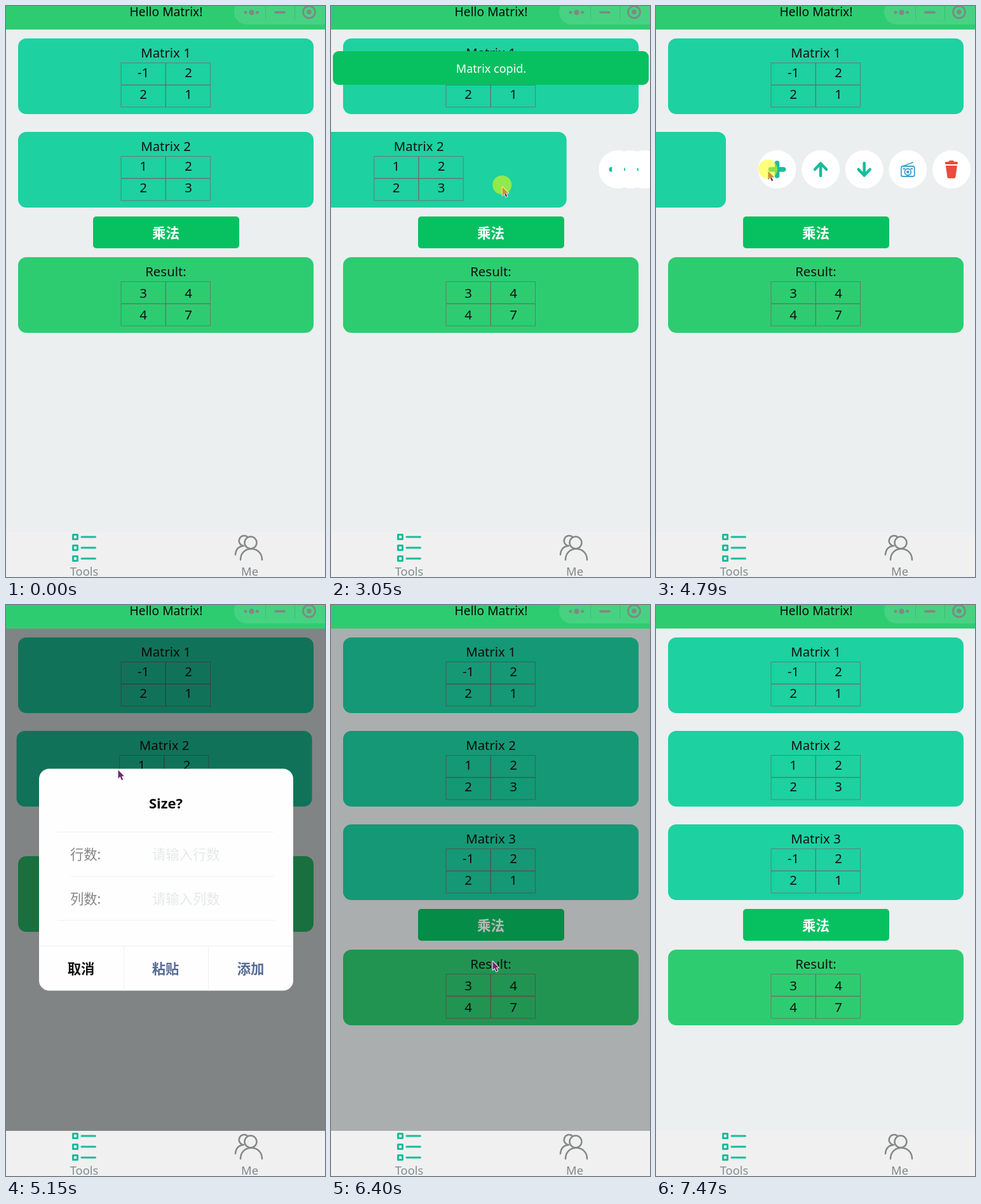
An HTML page with a canvas for the animation above (8090 ms loop, 502 by 898 pixels).

```html
<!DOCTYPE html>
<html lang="zh">
<head>
<meta charset="utf-8">
<title>Hello Matrix!</title>
<style>
html, body { margin: 0; width: 100%; height: 100%; overflow: hidden; }
canvas { display: block; }
</style>
</head>
<body>
<canvas id="stage" width="502" height="898"></canvas>
<script>
const ctx = document.getElementById('stage').getContext('2d');
const LOOP = 8090;
const FONT = '"Noto Sans", "Noto Sans CJK SC", "Noto Sans CJK", sans-serif';
const TEAL = '#1abc9c', CARD = '#1dd1a1', GREEN = '#2ecc71', BUTTON = '#07c160', GRAY = '#808888';

// Pointer tip: time, x, y
const path = [
  [550, 270, 424], [700, 291, 300], [910, 329, 134],
  [2010, 329, 134], [2300, 275, 280], [2450, 263, 337], [2800, 382.5, 304],
  [2950, 382.5, 304], [3050, 270, 284], [3200, 149, 267],
  [3730, 149, 267], [3810, 176, 259],
  [5310, 176, 259], [5610, 254, 560],
  [7150, 254, 560], [7240, 240, 630], [7470, 372, 898]
];
const presses = [[1070, 1880], [2950, 3250], [4790, 4880], [6120, 6200]];

const progress = (t, start, length) => Math.min(1, Math.max(0, (t - start) / length));
const easeOut = p => 1 - (1 - p) ** 3;

function pointerAt(t) {
  const i = path.findIndex(k => k[0] > t);
  if (i < 1) return null;
  const [t0, x0, y0] = path[i - 1], [t1, x1, y1] = path[i];
  const p = (t - t0) / (t1 - t0);
  return [x0 + (x1 - x0) * p, y0 + (y1 - y0) * p];
}

function slideAt(t) {
  if (t < 2950) return 0;
  if (t < 3250) return 382.5 - pointerAt(t)[0];
  if (t < 4850) return 233.5 + 140.5 * easeOut(progress(t, 3250, 480));
  return 374 * (1 - easeOut(progress(t, 4850, 370)));
}

function maskAt(t) {
  return t < 6200 ? 0.5 * progress(t, 4880, 300) : 0.5 * (1 - progress(t, 6200, 300) ** 2);
}

function text(s, x, y, size, color = '#111', weight = 400, align = 'center') {
  ctx.font = `${weight} ${size}px ${FONT}`;
  ctx.textAlign = align;
  ctx.fillStyle = color;
  ctx.fillText(s, x, y);
}

function box(x, y, w, h, r, color) {
  ctx.fillStyle = color;
  ctx.beginPath();
  ctx.roundRect(x, y, w, h, r);
  ctx.fill();
}

function disc(x, y, r, color) {
  ctx.fillStyle = color;
  ctx.beginPath();
  ctx.arc(x, y, r, 0, 7);
  ctx.fill();
}

function stroke(d, color, width) {
  ctx.strokeStyle = color;
  ctx.lineWidth = width;
  ctx.stroke(new Path2D(d));
}

function card(title, y, cells, color = CARD, drop = 0) {
  box(19, y, 465, 119, 13, color);
  text(title, 251.5, y + 30, 20.4);
  cells.forEach((value, i) => {
    const col = i % 2, row = i >> 1;
    ctx.strokeStyle = 'rgba(125,95,100,.75)';
    ctx.lineWidth = 1;
    ctx.strokeRect(181.5 + col * 70, y + 38.5 + row * 35, 70, 34.5);
    text(value, 216 + col * 71, y + 61 + drop + row * 34, 20.4);
  });
}

const icons = [
  () => stroke('M0-10V10M-10 0H10', TEAL, 7.5),
  () => stroke('M0 10V-9M-9 0L0-9.5L9 0', TEAL, 4.5),
  () => stroke('M0-10V9M-9 0L0 9.5L9 0', TEAL, 4.5),
  () => {
    stroke('M-8-5H8Q10.500-5 10.500-2V8Q10.500 11 8 11H-8Q-10.500 11-10.500 8V-2Q-10.500-5-8-5M-8-5L8-11M-7-1H-5M5-1H7', '#419fcb', 1.8);
    stroke('M-5 4A5 5 0 1 1 5 4A5 5 0 1 1-5 4', '#419fcb', 1.8);
    disc(0, 4, 2.3, '#419fcb');
  },
  () => {
    box(-10, -12, 20, 4, 1.5, '#e74c3c');
    box(-4, -14, 8, 4, 1.5, '#e74c3c');
    ctx.fill(new Path2D('M-9-6H9L6.500 12Q6 14 4 14H-4Q-6 14-6.500 12Z'));
  }
];

function actions(slide) {
  icons.forEach((icon, i) => {
    const x = 564.5 - (374 - 68.6 * i) * slide / 374;
    ctx.save();
    ctx.translate(x, 257);
    disc(0, 0, 30, '#fff');
    icon();
    ctx.restore();
  });
}

function header() {
  box(0, 0, 502, 37, 0, GREEN);
  text('Hello Matrix!', 252, 16, 19.2, '#0a0a0a');
  box(359, -10, 160, 39, 19.5, 'rgba(255,255,255,.12)');
  const mark = '#808984';
  disc(377, 10, 2.5, mark);
  disc(386.5, 10, 4.3, mark);
  disc(395.5, 10, 2.5, mark);
  stroke('M408.500 0V21M454.500 0V21', '#3cbd75', 1);
  stroke('M424 10H438', mark, 3.8);
  stroke('M467.500 9.500A9.500 9.500 0 1 1 486.500 9.500A9.500 9.500 0 1 1 467.500 9.500', mark, 2.8);
  disc(477, 9.5, 3.7, mark);
}

function tabBar() {
  box(0, 827, 502, 71, 0, '#f0f0f0');
  for (const y of [835, 852, 869]) {
    stroke(`M105.500 ${y - 3.5}h7v7h-7zM119 ${y}H140.500`, TEAL, 3);
  }
  stroke('M375.500 844A9.500 9.500 0 1 1 394.500 844A9.500 9.500 0 1 1 375.500 844' +
    'M369 871C369 848 403 848 403 871M374 849A8 8 0 1 1 380 835M361 863Q362 850 374 849', '#858888', 2.5);
  text('Tools', 123, 895.5, 18.4, '#7f908e');
  text('Me', 383.5, 895.5, 18.4, GRAY);
}

function dialog() {
  box(52, 257.5, 400, 349, 16, '#fefefe');
  text('Size?', 251.5, 319.5, 22, '#0a0a0a', 700);
  ['行数', '列数'].forEach((label, i) => {
    const y = 400 + 70 * i;
    text(label + ':', 101, y, 21.3, '#858585', 400, 'left');
    text('请输入' + label, 230, y, 21.3, '#e6e9e9', 400, 'left');
  });
  stroke('M82 357H422M102 427H422M82 496H422M52 536.500H452M185.500 537V606M318.500 537V606', '#efefef', 1);
  text('取消', 118, 580, 21.3, '#111', 700);
  text('粘贴', 251, 580, 21.3, '#576b95', 700);
  text('添加', 385, 580, 21.3, '#576b95', 700);
}

function pointer(t) {
  const tip = pointerAt(t);
  if (!tip) return;
  const [x, y] = tip;
  ctx.save();
  ctx.translate(x, y);
  const arrow = 'M.5.5V14L3.600 11L6 16.500L8.200 15.500L6 10.300H10Z';
  stroke(arrow, '#fff', 1.8);
  ctx.fillStyle = '#742870';
  ctx.fill(new Path2D(arrow));
  ctx.restore();
  if (presses.some(([on, off]) => t >= on && t < off)) disc(x, y - 2.5, 15, 'rgba(255,255,0,.52)');
}

function draw(t) {
  const slide = slideAt(t), pasted = t >= 6200, shift = pasted ? 147 : 0;
  box(0, 0, 502, 898, 0, '#ebeff0');
  card('Matrix 1', 51, [-1, 2, 2, 1]);
  ctx.save();
  ctx.translate(-slide, 0);
  card('Matrix 2', 198, [1, 2, 2, 3]);
  ctx.restore();
  if (slide > 0) actions(slide);
  if (pasted) card('Matrix 3', 345, [-1, 2, 2, 1]);
  box(137, 331 + shift, 230, 50, 5, BUTTON);
  text('乘法', 251.5, 365 + shift, 21.5, '#fff', 700);
  card('Result:', 395 + shift, [3, 4, 4, 7], GREEN, 3);
  if (t >= 1430 && t < 3430) {
    box(3, 71, 497, 53, 9, BUTTON);
    text('Matrix copid.', 252, 104.5, 18, '#fff');
  }
  box(0, 37, 502, 790, 0, `rgba(0,0,0,${maskAt(t)})`);
  if (t >= 4880 && t < 6200) {
    ctx.globalAlpha = progress(t, 4880, 150);
    dialog();
    ctx.globalAlpha = 1;
  }
  header();
  tabBar();
  pointer(t);
}

ctx.lineCap = 'round';
ctx.lineJoin = 'round';
const start = performance.now();
function tick() {
  draw((performance.now() - start) % LOOP);
  requestAnimationFrame(tick);
}
tick();
</script>
</body>
</html>
```
